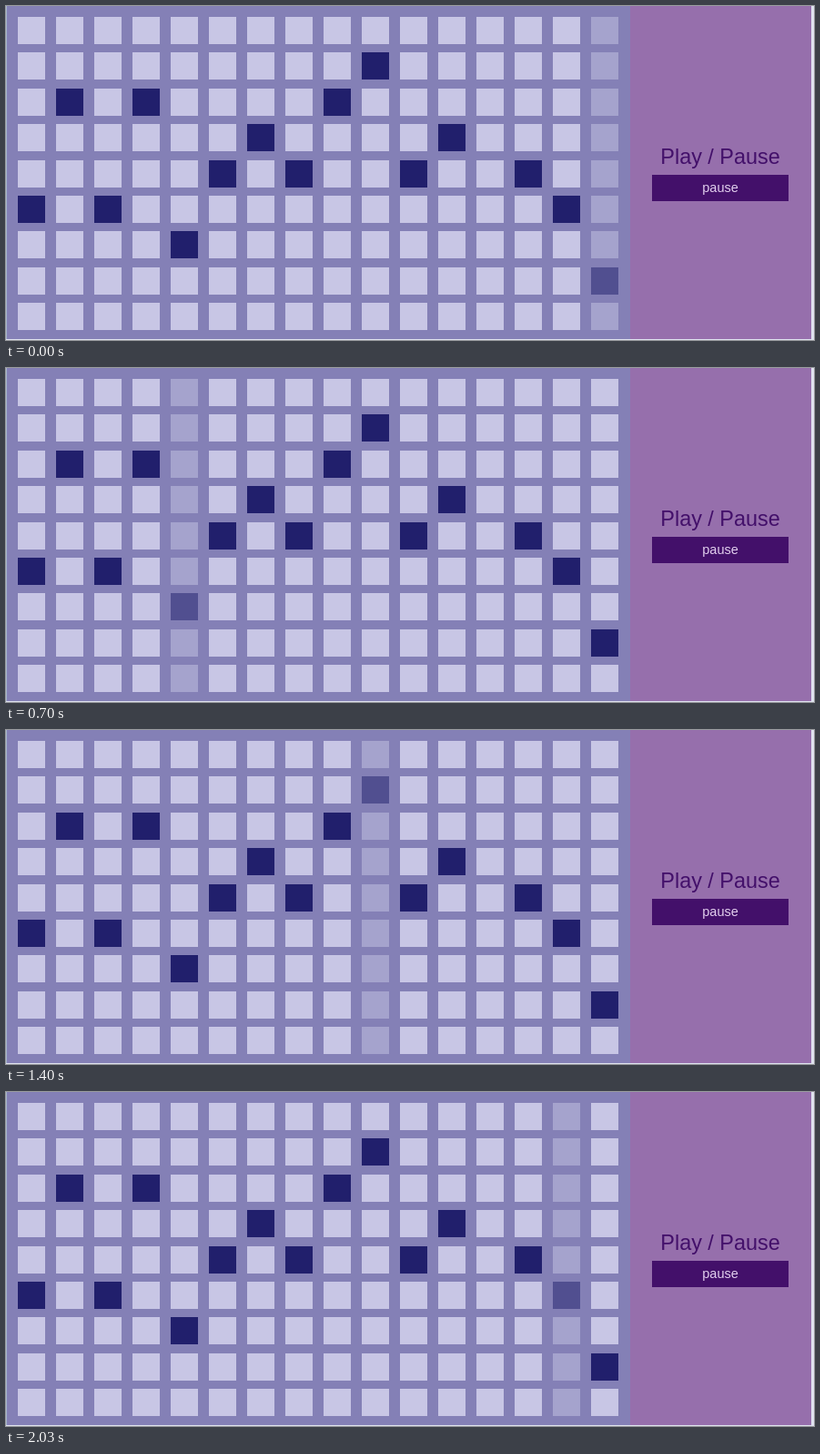
These frames come from a looping animation (888x368 px, 2.1 s). An HTML page with a canvas:

```html
<!DOCTYPE html>
<html lang="en">
<head>
<meta charset="utf-8">
<title>Step sequencer</title>
<style>
  html, body { margin: 0; width: 100%; height: 100%; overflow: hidden; }
  canvas { display: block; }
</style>
</head>
<body>
<canvas id="stage" width="888" height="368"></canvas>
<script>
const ctx = document.getElementById('stage').getContext('2d');

const LOOP = 2100;
const TICK = 70;       // display refresh, ms
const STEP = 136;      // time per column, ms
const LEAD = 20;       // time already spent on the first column, ms
const ROWS = 9;
const CELL = 30;
// Active row in each column; -1 is a rest.
const melody = [5, 2, 5, 2, 6, 4, 3, 4, 2, 1, 4, 3, -1, 4, 5, 7];
const COLS = melody.length;

const color = {
  edge: '#dfe3ef',
  side: '#a4b6cc',
  board: '#8480b6',
  cell: '#c8c6e5',
  note: '#211f6c',
  panel: '#966fac',
  dark: '#43106a',
  label: '#e2cfee'
};

function rect(x, y, w, h, fill) {
  ctx.fillStyle = fill;
  ctx.fillRect(x, y, w, h);
}

function text(str, x, y, size, fill) {
  ctx.font = `${size}px "Liberation Sans", Arial, sans-serif`;
  ctx.textAlign = 'center';
  ctx.fillStyle = fill;
  ctx.fillText(str, x, y);
}

function drawColumn(col, playing) {
  ctx.globalAlpha = playing ? 0.5 : 1;
  for (let row = 0; row < ROWS; row++) {
    const y = Math.round(12 + row * 39.4);
    rect(13 + col * 42, y, CELL, CELL, row === melody[col] ? color.note : color.cell);
  }
  ctx.globalAlpha = 1;
}

function drawPanel() {
  rect(686, 0, 199, 367, color.panel);
  text('Play / Pause', 785, 174, 23.4, color.dark);
  rect(710, 186, 150, 29, color.dark);
  text('pause', 785, 205, 14.5, color.label);
}

function draw(time) {
  const shown = Math.floor((time % LOOP) / TICK) * TICK;
  const step = Math.floor((shown + LEAD) / STEP);
  const active = (step + COLS - 1) % COLS;

  rect(0, 0, 888, 368, color.edge);
  rect(0, 0, 1, 367, color.side);
  rect(1, 0, 685, 367, color.board);
  for (let col = 0; col < COLS; col++) drawColumn(col, col === active);
  drawPanel();
}

const start = performance.now();
function frame() {
  draw(performance.now() - start);
  requestAnimationFrame(frame);
}
frame();
</script>
</body>
</html>
```
